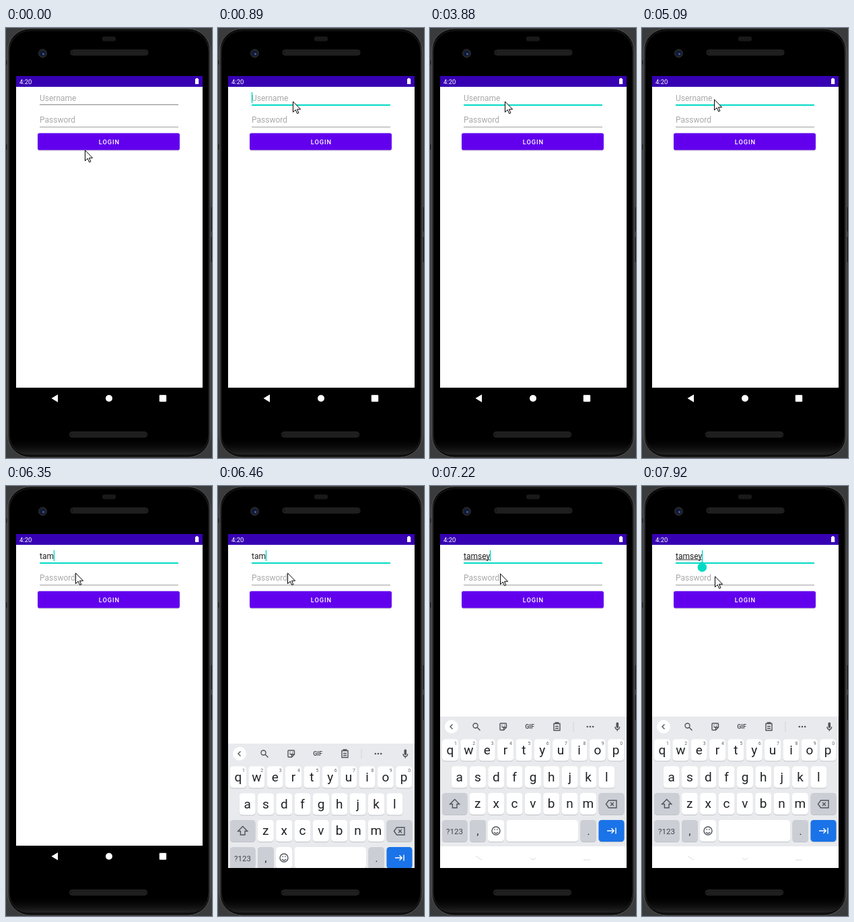
Recreate the animation shown at these times as an HTML page. Size 306 by 636 pixels, loop 8 s.

```html
<!DOCTYPE html>
<html lang="en">
<head>
<meta charset="utf-8">
<title>Login screen</title>
<style>
html, body { margin: 0; width: 100%; height: 100%; overflow: hidden; background: #3a3b3d; }
svg { display: block; width: 306px; height: 636px; font-family: Roboto, sans-serif; }
.field { font-size: 12px; }
.hint { fill: #a9a9a9; }
.key { font-size: 19px; fill: #1f2124; text-anchor: middle; }
.icon { fill: none; stroke: #50545a; stroke-width: 1.4; }
</style>
</head>
<body>
<svg viewBox="0 0 306 636">
  <defs>
    <linearGradient id="side">
      <stop offset="0" stop-color="#4a4a4a"/><stop offset=".012" stop-color="#161616"/>
      <stop offset=".03" stop-color="#0a0a0a"/><stop offset=".97" stop-color="#0a0a0a"/>
      <stop offset=".988" stop-color="#161616"/><stop offset="1" stop-color="#4a4a4a"/>
    </linearGradient>
    <linearGradient id="chin" x2="0" y2="1">
      <stop offset="0" stop-color="#000" stop-opacity="0"/><stop offset="1" stop-color="#262626"/>
    </linearGradient>
    <clipPath id="screen"><rect x="15" y="71" width="277" height="494"/></clipPath>
  </defs>

  <!-- phone body -->
  <rect width="306" height="636" fill="#3a3b3d"/>
  <path d="M1 48v6M1 172v8M305 265v36M305 309v37" stroke="#1c1c1c" stroke-width="2"/>
  <rect x="2" y="1" width="302" height="634" rx="34" fill="url(#side)" stroke="#505050"/>
  <rect x="5" y="4" width="296" height="628" rx="31" fill="#000" stroke="#1b1b1b"/>
  <path d="M6 606H300Q299 631 270 631H36Q7 631 6 606Z" fill="url(#chin)"/>
  <rect x="143" y="12.500" width="20" height="7" rx="3" fill="#191919"/>
  <g id="grilles"></g>
  <circle cx="54.500" cy="37.500" r="6" fill="#1d1f25" stroke="#303136"/>
  <circle cx="54.500" cy="37.500" r="3.500" fill="#101a3c"/>
  <circle cx="55.500" cy="38.500" r="1.300" fill="#5570bd"/>

  <!-- app -->
  <g clip-path="url(#screen)">
    <rect x="15" y="71" width="277" height="461" fill="#fff"/>
    <rect x="15" y="71" width="277" height="16" fill="#3700b3"/>
    <text x="20" y="82.700" font-size="9.500" fill="#fff">4:20</text>
    <path d="M281 75.200h1.500v-1.200h2.200v1.200h1.500V83h-5.200z" fill="#fff"/>
    <rect x="15" y="532" width="277" height="33" fill="#000"/>
    <g fill="#fff">
      <path d="M67.500 547.700L77 542v11.400z"/>
      <circle cx="153" cy="547.800" r="5"/>
      <rect x="227.800" y="542.700" width="10.400" height="10" rx="1"/>
    </g>

    <text id="hint" class="field hint" x="50" y="108">Username</text>
    <text id="name" class="field" x="50" y="108" fill="#202020"></text>
    <rect id="under" x="50" y="108.500" height="1" fill="#333"/>
    <rect id="line" x="50" width="206"/>
    <rect id="caret" y="95" width="1.400" height="16" fill="#03dac5"/>
    <text class="field hint" x="50" y="140">Password</text>
    <rect x="50" y="146" width="206" height="1" fill="#a0a0a0"/>
    <rect x="47" y="156" width="211" height="25.500" rx="3" fill="#000" opacity=".2"/>
    <rect x="47" y="155.500" width="211" height="25" rx="2.800" fill="#6200ee"/>
    <text x="153.400" y="171.600" font-size="9.300" font-weight="500" letter-spacing=".9"
      text-anchor="middle" fill="#fff">LOGIN</text>
    <path id="handle" d="M0 0L4.800 4.400A6.800 6.800 0 1 1 -4.800 4.400Z" fill="#03dac5"/>

    <g id="board">
      <rect x="15" y="341" width="277" height="192" fill="#e8eaed"/>
      <rect x="15" y="533" width="277" height="40" fill="#fff"/>
      <circle cx="32" cy="356" r="10" fill="#fff"/>
      <g class="icon">
        <path d="M33.500 352.500l-3.500 3.500 3.500 3.500"/>
        <circle cx="67.500" cy="354.500" r="3.500"/><path d="M70 357l4.500 4.500"/>
        <path d="M105 351h7.500q1 0 1 1v5l-4 4h-4.500q-1 0-1-1v-8q0-1 1-1zM113.500 357h-4v4M106.500 355.500q2 3 4.500 0M106.500 353.500h1M110.500 353.500h1"/>
        <path d="M184 351.500h9v10h-9zM186.300 352v-2h4.500v2M186 355.500h5M186 358.500h5"/>
        <path d="M275 356q0 4 3.300 4t3.300-4M278.300 360v2.500"/>
      </g>
      <text x="148" y="359.300" font-size="9" font-weight="700" text-anchor="middle" fill="#50545a">GIF</text>
      <path d="M213 348.500v15" stroke="#d2d4d8"/>
      <g fill="#50545a">
        <circle cx="233.800" cy="356" r="1.300"/><circle cx="238" cy="356" r="1.300"/><circle cx="242.200" cy="356" r="1.300"/>
        <rect x="276.500" y="349.500" width="3.600" height="8.500" rx="1.800"/>
      </g>
      <g id="keys"></g>
      <g class="icon">
        <path d="M36.700 463.500l-7 7h3.700v5.500h6.600v-5.500h3.700z"/>
        <path d="M265.500 465h11.500v11h-11.500l-4-5.500zM268 468l5 5M273 468l-5 5"/>
        <circle cx="98" cy="510" r="6"/>
        <path d="M95 512q3 3.500 6 0M95.500 508h1.500M99 508h1.500"/>
        <path d="M263 510h10M269.500 506.300l3.700 3.700-3.700 3.700M276 505.500v9" stroke="#fff"/>
      </g>
      <text x="36.500" y="514.500" font-size="11.500" text-anchor="middle" fill="#40444a">?123</text>
      <text class="key" x="71" y="516" style="font-size:15px">,</text>
      <text class="key" x="235.500" y="516" style="font-size:15px">.</text>
      <path d="M68 547.500l9 5.500M148.500 550q4.500 5 9 0M228 553h10" fill="none" stroke="#dcdcdc"/>
    </g>
  </g>

  <path id="mouse" d="M.5 .8V16.500L4.200 13 6.700 18.500 8.900 17.600 6.500 12.200H11.600Z" fill="#fff" stroke="#000"/>
</svg>
<script>
const LOOP = 8000;
const $ = id => document.getElementById(id);

function add(parent, tag, attrs, text) {
  const el = document.createElementNS("http://www.w3.org/2000/svg", tag);
  for (const k in attrs) el.setAttribute(k, attrs[k]);
  if (text) el.textContent = text;
  $(parent).append(el);
}

function key(x, y, w, fill = "#fff") {
  add("keys", "rect", { x, y: y + 1, width: w, height: 32, rx: 4.5, fill: "#bfc2c7" });
  add("keys", "rect", { x, y, width: w, height: 32, rx: 4.5, fill });
}

["qwertyuiop", "asdfghjkl", "zxcvbnm"].forEach((row, r) => {
  const y = [374.5, 414.5, 454][r];
  [...row].forEach((ch, i) => {
    const x = [30, 43.6, 70.8][r] + i * 27.35;
    key(x - 12, y, 24);
    add("keys", "text", { class: "key", x, y: y + 22 }, ch);
    if (!r) add("keys", "text", { x: x + 6, y: 383, "font-size": 7, fill: "#60646a" }, String((i + 1) % 10));
  });
});
key(18, 454, 37.5, "#ccced5");
key(250.5, 454, 38, "#ccced5");
key(18, 494, 37.5, "#ccced5");
key(59, 494, 24, "#ccced5");
key(86, 494, 24);
key(113.5, 494, 106.5);
key(223.5, 494, 23.5, "#ccced5");
key(250.5, 494, 38, "#1a73e8");

function grille(x, y) {
  add("grilles", "rect", { x, y, width: 115, height: 7.5, rx: 3.5, fill: "#141414", stroke: "#303030" });
  [2.2, 3.8, 5.4].forEach((dy, i) => add("grilles", "path", {
    d: `M${x + 3 + i % 2} ${y + dy}h109`, stroke: "#393939", "stroke-dasharray": "1 1"
  }));
}
grille(96, 32.5);
grille(94.500, 597.5);

// pointer moves: start, end, steps, x, y
const moves = [
  [60, 290, 6, 102, 118], [540, 600, 2, 111, 108], [4240, 4330, 3, 127, 107],
  [4730, 4800, 3, 108, 105], [5090, 5090, 1, 107, 105],
  [6250, 6350, 3, 103, 128], [7220, 7390, 5, 108, 133]
];
const typed = [[5910, 1], [6080, 2], [6190, 3], [6990, 4], [7080, 5], [7160, 6]];
const caretOn = [[890, 1550], [2240, 3880], [6080, 6510], [6540, LOOP]];
const word = "tamsey";

function pointer(t) {
  let x = 117, y = 180;
  for (const [a, b, n, tx, ty] of moves) {
    if (t < a) break;
    const step = n > 1 ? Math.floor((t - a) / (b - a) * (n - 1) + 1e-6) + 1 : 1;
    const p = Math.min(1, step / n);
    x += (tx - x) * p;
    y += (ty - y) * p;
  }
  return [Math.round(x), Math.round(y)];
}

function set(id, attrs) {
  for (const k in attrs) $(id).setAttribute(k, attrs[k]);
}
const show = (id, on) => set(id, { visibility: on ? "visible" : "hidden" });

function draw(t) {
  const count = typed.reduce((n, [at, len]) => t >= at ? len : n, 0);
  $("name").textContent = word.slice(0, count);
  const w = count ? $("name").getComputedTextLength() : 0;
  const focus = t >= 890;

  show("hint", !count);
  set("line", { y: focus ? 113 : 113, height: focus ? 2 : 1, fill: focus ? "#03dac5" : "#858585" });
  set("caret", { x: 49.8 + w });
  show("caret", caretOn.some(([a, b]) => t >= a && t < b));
  set("under", { width: w });
  show("under", t >= 6700);

  const size = t >= 7920 ? 1 : 0.6;
  set("handle", { transform: `translate(${50.2 + w} 111) scale(${size})` });
  show("handle", t >= 7860);

  set("board", { transform: `translate(0 ${t < 6510 ? 40 : 0})` });
  show("board", t >= 6460);
  set("mouse", { transform: `translate(${pointer(t)})` });
}

const start = performance.now();
function tick() {
  draw((performance.now() - start) % LOOP);
  requestAnimationFrame(tick);
}
tick();
</script>
</body>
</html>
```
